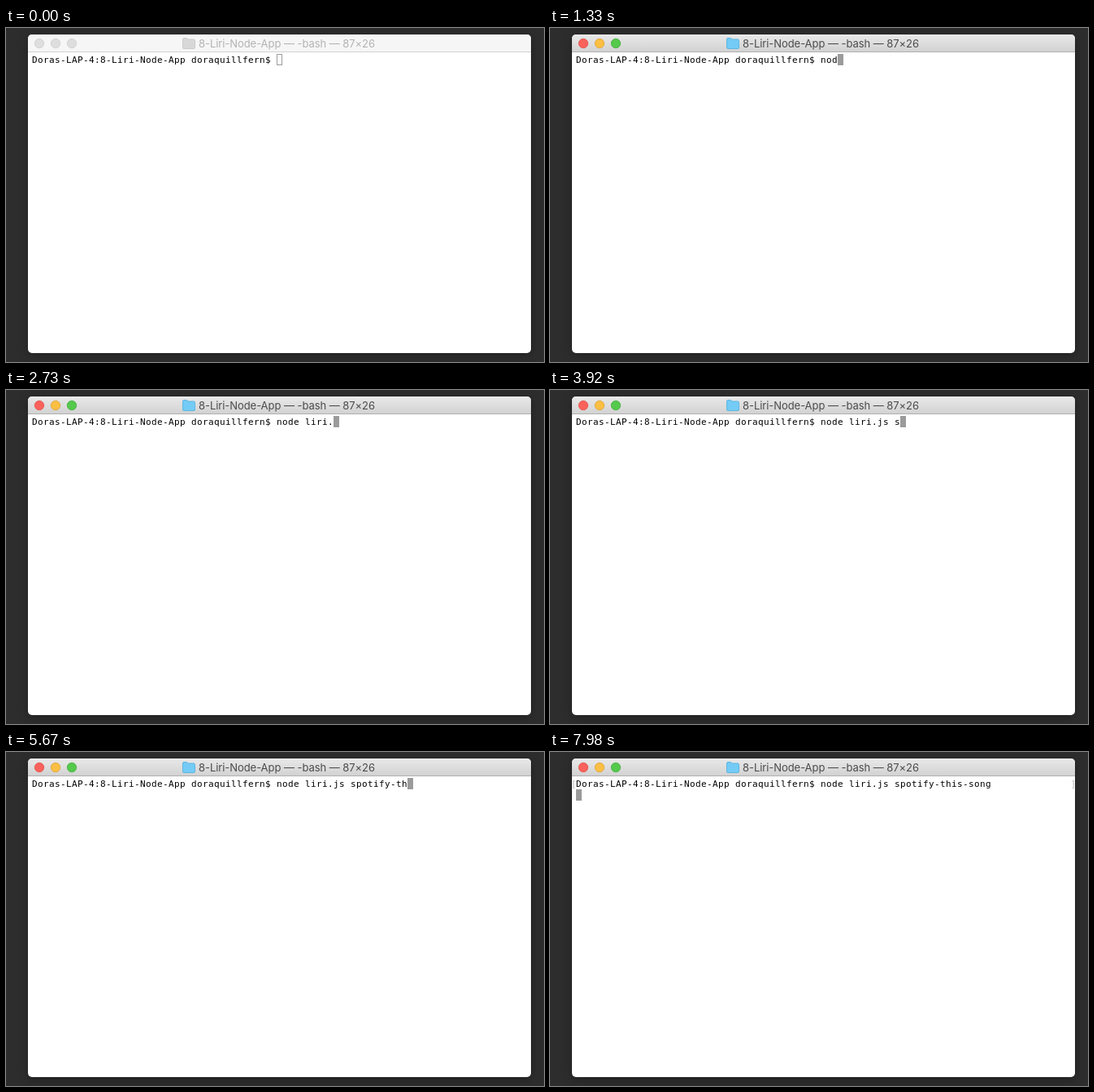
An HTML page for the animation above (8 s loop, 662 by 412 pixels).

```html
<!DOCTYPE html>
<html lang="en">
<head>
<meta charset="utf-8">
<title>Terminal session</title>
<style>
  html, body { margin: 0; width: 100%; height: 100%; overflow: hidden; background: #2d2d2d; }
  svg { display: block; width: 662px; height: 412px; }
  .mono { font: 11px "DejaVu Sans Mono", monospace; letter-spacing: .378px; white-space: pre; fill: #000; }
  .title { font: 13px Inter, "Liberation Sans", sans-serif; letter-spacing: -.06px; fill: #4b4b4b; }
  .win { filter: drop-shadow(0 3px 6px rgba(0, 0, 0, .28)); }
  .mark { fill: #b4b4b4; }
  .rule { fill: #b1b1b1; }
  .bar { fill: url(#barFill); }
  .folder { fill: #74cbf5; stroke: #5eb6e2; }
  .light { stroke-width: .8; }
  .cursor { fill: #9b9b9b; stroke: #9b9b9b; }
  .idle .bar { fill: #f6f6f6; }
  .idle .rule { fill: #d2d2d2; }
  .idle .title { fill: #b3b3b3; }
  .idle .folder { fill: #d8d8d8; stroke: #cbcbcb; }
  .idle .light { fill: #dedede; stroke: #cdcdcd; }
  .idle .cursor { fill: #fff; }
</style>
</head>
<body>
<svg id="stage" class="idle" viewBox="0 0 662 412">
  <defs>
    <linearGradient id="barFill" x1="0" y1="0" x2="0" y2="1">
      <stop offset="0" stop-color="#e9e9e9"/>
      <stop offset="1" stop-color="#d2d2d2"/>
    </linearGradient>
  </defs>
  <rect width="662" height="412" fill="#2d2d2d"/>
  <rect class="win" x="27" y="8" width="619" height="393" rx="5" fill="#fff"/>
  <path class="bar" d="M27 29V13a5 5 0 0 1 5-5H641a5 5 0 0 1 5 5V29Z"/>
  <rect class="rule" x="27" y="29" width="619" height="1"/>
  <circle class="light" cx="41" cy="19" r="5.7" fill="#fa625b" stroke="#e1504a"/>
  <circle class="light" cx="61" cy="19" r="5.7" fill="#fbbf43" stroke="#dfa336"/>
  <circle class="light" cx="81" cy="19" r="5.7" fill="#54c94c" stroke="#42ae3b"/>
  <path class="folder" d="M217.5 14q0-1.5 1.5-1.5H222.500l1.500 1.500H231q1.500 0 1.500 1.500V24q0 1.500-1.500 1.500H219q-1.500 0-1.500-1.500Z"/>
  <text class="title" x="237" y="24">8-Liri-Node-App — -bash — 87×26</text>
  <rect id="cursor" class="cursor" x="333.5" y="32.5" width="6" height="13"/>
  <text id="line" class="mono" x="32" y="43"></text>
  <g id="marks" visibility="hidden">
    <text class="mono mark" x="26" y="43">[</text>
    <text class="mono mark" x="640.5" y="43">]</text>
  </g>
</svg>
<script>
  const LOOP = 8000, FOCUS = 420, ENTER = 7980;
  const LEFT = 32, TOP = 32, CELL = 7, ROW = 14;
  const prompt = "Doras-LAP-4:8-Liri-Node-App doraquillfern$ ";
  const command = "node liri.js spotify-this-song";

  // Time at which each character of the command appears
  const keys = [
    1050, 1190, 1330, 1610, 1750,
    1960, 2170, 2240, 2380, 2730, 2940, 3150, 3360,
    3920, 4060, 4200, 4410, 4550, 4760, 4900,
    5390, 5530, 5670, 5880, 6020,
    6790, 7000, 7140, 7350, 7560
  ];

  const $ = id => document.getElementById(id);
  const stage = $("stage"), line = $("line"), cursor = $("cursor"), marks = $("marks");

  function draw(t) {
    const typed = keys.filter(k => k <= t).length;
    const sent = t >= ENTER;
    const col = sent ? 0 : prompt.length + typed;
    stage.setAttribute("class", t < FOCUS ? "idle" : "");
    line.textContent = prompt + command.slice(0, typed);
    cursor.setAttribute("x", LEFT + col * CELL + 0.5);
    cursor.setAttribute("y", TOP + (sent ? ROW : 0) + 0.5);
    marks.setAttribute("visibility", sent ? "visible" : "hidden");
  }

  const start = performance.now();
  function tick() {
    draw((performance.now() - start) % LOOP);
    requestAnimationFrame(tick);
  }
  tick();
</script>
</body>
</html>
```
